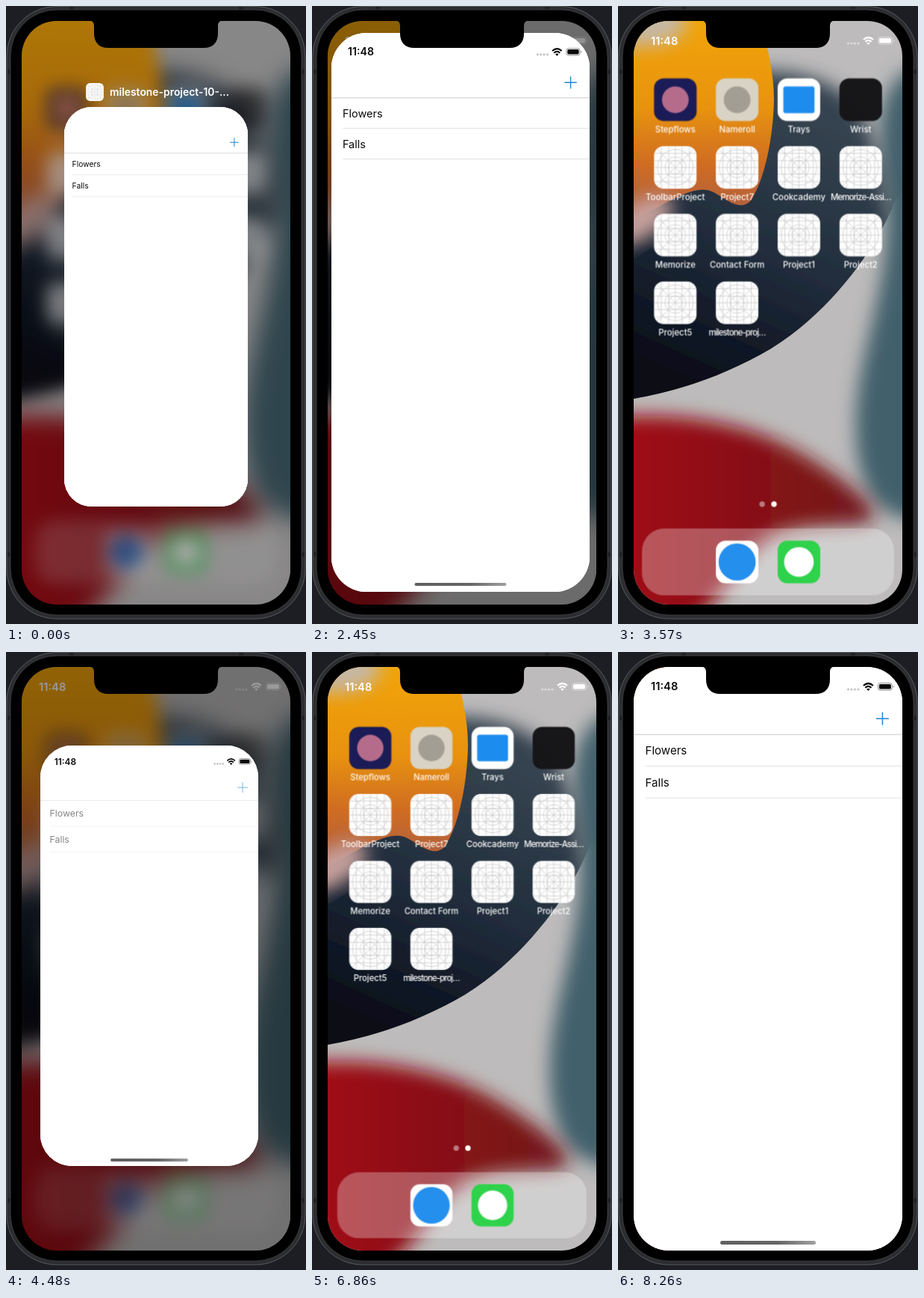
Write an HTML page that moves like this. It is 402 by 826 pixels and loops after 8.96 s.

```html
<!DOCTYPE html>
<html lang="en">
<head>
<meta charset="utf-8">
<title>Phone app switching</title>
<style>
  html, body { margin: 0; width: 100%; height: 100%; overflow: hidden; background: #1d1e23; }
  #stage { position: relative; width: 402px; height: 826px; overflow: hidden; }
  svg { position: absolute; left: 0; top: 0; display: block; font-family: Inter, "Open Sans", sans-serif; }
  #screen { position: absolute; left: 21px; top: 20px; width: 360px; height: 780px; border-radius: 47px; overflow: hidden; background: #000; }
  #home, #dim { position: absolute; inset: 0; }
  #dim { background: #000; }
  #home svg { overflow: visible; }
  #icons { transform-origin: 201px 410px; }
  #card { position: absolute; overflow: hidden; background: #fff; }
  #face { position: absolute; inset: 0; background: #fff; }
  #bar { position: absolute; left: 50%; transform: translateX(-50%); border-radius: 3px; background: linear-gradient(90deg, #606060, #666 60%, #a0a0a0); }
  .label { font-size: 11.4px; font-weight: 500; fill: #fff; text-anchor: middle; }
  .row { font-size: 15.1px; fill: #0b0b0b; }
</style>
</head>
<body>
<div id="stage">
  <svg width="402" height="826">
    <rect x="1" y=".5" width="400" height="818.5" rx="67" fill="#2c2d30" stroke="#58595c"/>
    <path d="M2 88H6M396 88H400M2 733H6M396 733H400M88 1V5M315 1V5" stroke="#1f2023" stroke-width="6"/>
    <rect x="6" y="5" width="390" height="809" rx="62" fill="#000" stroke="#444548" stroke-width=".8"/>
  </svg>

  <div id="screen">
    <div id="home">
      <svg width="360" height="780" viewBox="21 20 360 780">
        <defs>
          <filter id="soft" x="-30%" y="-30%" width="160%" height="160%"><feGaussianBlur stdDeviation="12"/></filter>
          <linearGradient id="amber" x1="0" y1="0" x2="0" y2="1">
            <stop offset=".1" stop-color="#f3a908"/><stop offset=".48" stop-color="#e8920f"/>
            <stop offset=".68" stop-color="#cf6c22"/><stop offset=".85" stop-color="#b0603f"/>
          </linearGradient>
          <linearGradient id="navy" x1=".7" y1="0" x2=".3" y2="1">
            <stop offset=".1" stop-color="#35434f"/><stop offset=".5" stop-color="#1f2b3a"/><stop offset=".85" stop-color="#080d19"/>
          </linearGradient>
          <linearGradient id="crimson">
            <stop offset=".1" stop-color="#a50711"/><stop offset="1" stop-color="#70181b"/>
          </linearGradient>
          <clipPath id="horizon"><path d="M-60-60H460V200L372 258C350 318 290 405 205 458C150 490 90 513 21 525L-60 538Z"/></clipPath>
          <symbol id="grid" viewBox="-29 -29 58 58">
            <rect x="-28.7" y="-28.7" width="57.4" height="57.4" rx="13" fill="#fff"/>
            <g fill="none" stroke="#bdbdbd" stroke-width=".6">
              <path d="M-28 0H28M0-28V28M-28-9H28M-28 9H28M-9-28V28M9-28V28M-28-19H28M-28 19H28M-19-28V28M19-28V28M-25-25L25 25M25-25L-25 25"/>
              <circle r="9"/><circle r="14"/><circle r="24"/>
            </g>
          </symbol>
        </defs>
        <rect x="-40" y="-40" width="480" height="900" fill="#bdbbbb"/>
        <path d="M440 75C345 75 345 150 358 250C368 340 338 420 324 500C312 570 320 640 350 668C370 685 400 690 440 690Z" fill="#42606c" filter="url(#soft)"/>
        <g clip-path="url(#horizon)">
          <path d="M-60 250L150 90C220 80 280 92 318 130C350 175 362 250 368 330L200 570H-60Z" fill="url(#navy)" filter="url(#soft)"/>
        </g>
        <path d="M-60-40H178C192 30 209 75 209 125C208 180 195 235 178 260C165 274 150 262 130 250C100 232 60 270-60 330Z" fill="url(#amber)"/>
        <ellipse cx="28" cy="288" rx="52" ry="24" transform="rotate(-32 28 288)" fill="#c7a19d" filter="url(#soft)"/>
        <ellipse id="glow" cx="30" cy="22" rx="62" ry="32" fill="#c5b8a6" filter="url(#soft)"/>
        <path d="M-60 555C60 535 170 555 240 595C300 630 350 668 342 686C318 700 250 684 200 712C155 745 135 812 60 850H-60Z" fill="url(#crimson)" filter="url(#soft)"/>
        <g id="icons"></g>
      </svg>
    </div>
    <svg id="homeStatus" width="360" height="780" viewBox="21 20 360 780"></svg>
    <div id="dim"></div>
    <svg id="header" width="360" height="780" viewBox="21 20 360 780">
      <use href="#grid" x="107" y="103" width="24" height="24"/>
      <text x="139" y="120" font-size="13.9" font-weight="600" fill="#fff">milestone-project-10-...</text>
    </svg>
    <div id="card">
      <svg width="100%" height="100%" viewBox="-28 -28 56 56" preserveAspectRatio="xMidYMid slice"><use href="#grid" x="-29" y="-29" width="58" height="58"/></svg>
      <div id="face">
        <svg id="app" viewBox="21 20 360 780">
          <g id="appStatus"></g>
          <g id="list">
            <path d="M21 110.3H381" stroke="#c9c9cb"/>
            <path d="M37 152.6H381M37 195.2H381" stroke="#dedee0" stroke-width=".9"/>
            <path d="M346 89H363M354.5 80.5V97.5" stroke="#1f86cc" stroke-width="1.5"/>
            <text class="row" x="36.5" y="137.5">Flowers</text>
            <text class="row" x="36.5" y="180">Falls</text>
          </g>
        </svg>
        <div id="bar"></div>
      </div>
    </div>
  </div>

  <svg width="402" height="826">
    <path d="M111 19C116 20 118 22 118 27V37C118 49 125 56 137 56H265C277 56 284 49 284 37V27C284 22 286 20 291 19Z" fill="#000"/>
  </svg>
</div>

<script>
const $ = id => document.getElementById(id);
const clamp = v => Math.max(0, Math.min(1, v));
const mix = (a, b, k) => a + (b - a) * k;

const statusBar = (ink, dots) => `
  <text x="44" y="51.5" font-size="14.7" font-weight="600" fill="${ink}">11:48</text>
  <g fill="${dots}">${[0, 1, 2, 3].map(i => `<circle cx="${308.5 + i * 4.5}" cy="50" r="1.6"/>`).join('')}</g>
  <path d="M329 45Q335.5 39 342 45M331.4 47.8Q335.5 44 339.6 47.8" fill="none" stroke="${ink}" stroke-width="2.2"/>
  <path d="M333.2 49.6Q335.5 47.8 337.8 49.6L335.5 52Z" fill="${ink}"/>
  <rect x="348.5" y="41.5" width="19" height="9.6" rx="3" fill="none" stroke="${ink}" stroke-opacity=".45"/>
  <rect x="350" y="43" width="16" height="6.6" rx="1.7" fill="${ink}"/>
  <path d="M369 44.6Q371 46.3 369 48Z" fill="${ink}" opacity=".5"/>`;

$('homeStatus').innerHTML = statusBar('#fff', '#ffffff80');
$('appStatus').innerHTML = statusBar('#0a0a0a', '#c4c4c6');

// Home screen icons
const tile = (x, y, fill, mark = '') =>
  `<g transform="translate(${x} ${y})"><rect x="-28.7" y="-28.7" width="57.4" height="57.4" rx="13" fill="${fill}"/>${mark}</g>`;
const disc = (r, fill) => `<circle r="${r}" fill="${fill}"/>`;
const named = {
  Stepflows: ['#1b1c58', disc(18, '#b56c8c')],
  Nameroll: ['#d8d3c5', disc(18, '#a29e94')],
  Trays: ['#fff', '<rect x="-21" y="-18" width="42" height="36" rx="3" fill="#1e8df0"/>'],
  Wrist: ['#17171a']
};
const labels = [...Object.keys(named), 'ToolbarProject', 'Project7', 'Cookcademy', 'Memorize-Assi…',
  'Memorize', 'Contact Form', 'Project1', 'Project2', 'Project5', 'milestone-proj…'];

$('icons').innerHTML = labels.map((label, i) => {
  const x = 76 + i % 4 * 83.3, y = 123.5 + Math.floor(i / 4) * 91;
  const slot = label.startsWith('milestone') ? 'id="slot"' : '';
  const art = named[label] ? tile(x, y, ...named[label])
    : `<use ${slot} href="#grid" x="${x - 29}" y="${y - 29}" width="58" height="58"/>`;
  const tight = label.endsWith('…') ? 'letter-spacing="-.85"' : '';
  return `${art}<text class="label" x="${x}" y="${y + 44}" ${tight}>${label}</text>`;
}).join('') + `
  <circle cx="193" cy="667.3" r="3.7" fill="#fff" opacity=".45"/><circle cx="209" cy="667.3" r="3.7" fill="#fff"/>
  <rect x="31" y="700" width="340" height="90" rx="30" fill="#fff" opacity=".3"/>`
  + tile(159.3, 745, '#fff', disc(25, '#2490ee'))
  + tile(242.6, 745, '#2fd24b', disc(20, '#fff'));

// Resting places of the app window
const FULL = { x: 201, y: 410, w: 360, h: 780 };
const SWITCHER = { x: 201, y: 402, w: 246, h: 534 };
const ICON = { x: 159.8, y: 397, w: 56, h: 56 };
const APP_DIM = .45, SWITCHER_DIM = .28;

const spring = (u, rate) => 1 - (1 + rate * u) * Math.exp(-rate * u);
const between = (a, b, k, kTall = k) => ({
  x: mix(a.x, b.x, k), y: mix(a.y, b.y, kTall), w: mix(a.w, b.w, k), h: mix(a.h, b.h, kTall)
});

// Each move gives the window box, the dimming of the home screen and its icon scale
const moves = {
  rest: () => ({ box: SWITCHER, dim: SWITCHER_DIM, scale: .955 }),
  zoom(u) {
    const k = spring(u, .0125);
    return { box: between(SWITCHER, FULL, k), dim: mix(SWITCHER_DIM, APP_DIM, k), scale: mix(.955, .9, k) };
  },
  close(u) {
    const left = Math.exp(-((u / 300) ** 2));
    return { box: between(ICON, FULL, left), dim: APP_DIM * left, scale: 1 - .1 * Math.exp(-u / 420) };
  },
  open: u => ({
    box: between(ICON, FULL, spring(u, .0136), spring(u, .0116)),
    dim: APP_DIM * spring(u, .018),
    scale: 1 - .1 * spring(u, .007)
  })
};
const timeline = [[0, 'rest'], [1260, 'zoom'], [2385, 'close'], [4270, 'open'], [6103, 'close'], [7490, 'open']];
const LOOP = 8960, STEP = 70;

function draw(time) {
  const t = Math.floor(time % LOOP / STEP) * STEP;
  const [start, name] = timeline.filter(([s]) => s <= t).pop();
  const { box: { x, y, w, h }, dim, scale } = moves[name](t - start);
  const fromSwitcher = name === 'rest' || name === 'zoom';
  const grown = fromSwitcher ? clamp((w - SWITCHER.w) / 70) : 1;
  const atHome = w < 58, s = w / FULL.w;

  $('home').style.filter = dim > .005 ? `blur(${Math.min(12, dim * 40)}px)` : 'none';
  $('icons').style.transform = `scale(${scale})`;
  $('icons').style.opacity = 1 - dim * 1.2;
  $('glow').style.opacity = 1 - clamp(dim / SWITCHER_DIM);
  $('slot').style.visibility = atHome ? 'visible' : 'hidden';
  $('homeStatus').style.opacity = fromSwitcher ? 0 : 1;
  $('dim').style.opacity = dim;
  $('header').style.opacity = fromSwitcher ? 1 - grown : 0;

  Object.assign($('card').style, {
    visibility: atHome ? 'hidden' : 'visible',
    left: `${x - 21 - w / 2}px`, top: `${y - 20 - h / 2}px`,
    width: `${w}px`, height: `${h}px`,
    borderRadius: `${Math.min(47, 13 + (w - ICON.w) * .125)}px`
  });
  $('face').style.opacity = clamp((w - 90) / 60);
  $('app').setAttribute('width', w);
  $('app').setAttribute('height', FULL.h * s);
  $('list').style.opacity = name === 'open' ? clamp((w - 246) / 94) : 1;
  $('appStatus').style.opacity = grown;
  Object.assign($('bar').style, {
    opacity: grown, bottom: `${8 * s}px`, width: `${128 * s}px`, height: `${4.6 * s}px`
  });
}

const origin = performance.now();
function tick() {
  draw(performance.now() - origin);
  requestAnimationFrame(tick);
}
tick();
</script>
</body>
</html>
```
